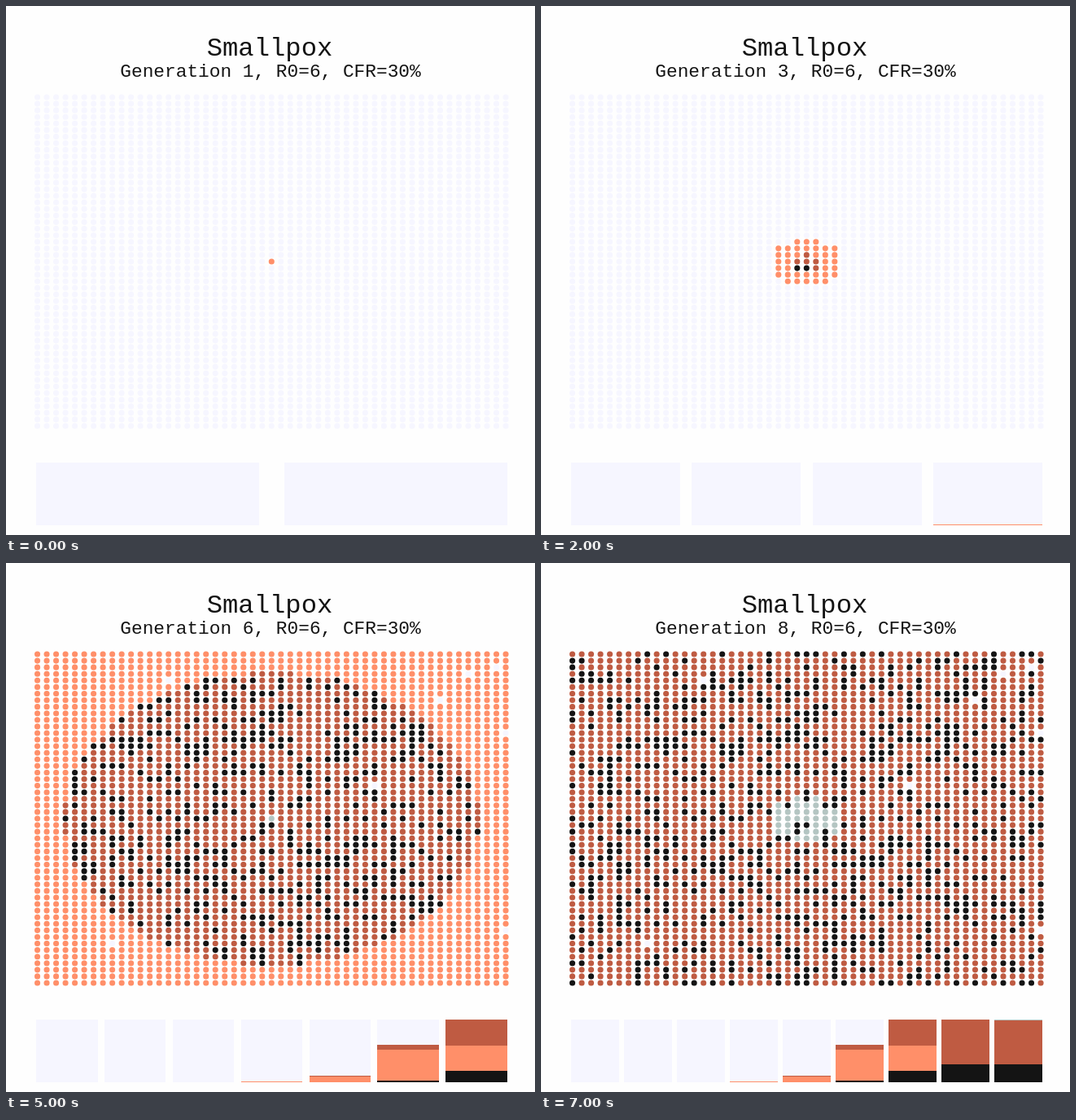
Animation of 650x650 px, one loop 8 s. Source, as an HTML page with a canvas:

```html
<!DOCTYPE html>
<html lang="en">
<head>
<meta charset="utf-8">
<title>Smallpox</title>
<style>
  html, body { margin: 0; width: 100%; height: 100%; overflow: hidden; background: #fefefe; }
  canvas, svg { position: absolute; left: 0; top: 0; display: block; }
  text { font-family: "Liberation Mono", "DejaVu Sans Mono", monospace; fill: #141414; text-anchor: middle; }
</style>
</head>
<body>
<canvas width="650" height="650"></canvas>
<svg width="650" height="650">
  <text x="324" y="61" font-size="32.2">Smallpox</text>
  <text id="info" x="325" y="87" font-size="22.8"></text>
</svg>
<script>
const SIZE = 51, MID = 25, R0 = 6, DEATH_RATE = 0.285, LAST = 8, STEP = 1000;
const COLOR = { well: '#f6f6ff', ill: '#ff8f69', immune: '#bf5b42', dead: '#141414', waned: '#b4c5c2' };
const ctx = document.querySelector('canvas').getContext('2d');
const info = document.getElementById('info');

// Cells that are never infected: column, row
const SPARED = new Set(['36,20', '14,4', '8,44', '43,7', '46,3', '49,2', '50,12', '50,42']);

function random(seed) {
  return () => {
    seed = seed + 0x6D2B79F5 | 0;
    let v = Math.imul(seed ^ seed >>> 15, 1 | seed);
    v = v + Math.imul(v ^ v >>> 7, 61 | v) ^ v;
    return ((v ^ v >>> 14) >>> 0) / 4294967296;
  };
}

function makeCells() {
  const cells = [], rnd = random(11);
  for (let row = 0; row < SIZE; row++)
    for (let col = 0; col < SIZE; col++)
      cells.push({ row, col, dist: (row - MID) ** 2 + (col - MID) ** 2 });
  // The infection spreads outwards, lower rows first among equals
  cells.sort((a, b) => a.dist - b.dist || b.row - a.row);
  let gen = 1, batch = 1, end = 1;
  cells.forEach((c, i) => {
    if (i === end) { gen++; batch *= R0; end += batch; }
    c.caught = SPARED.has(c.col + ',' + c.row) ? Infinity : gen;
    // The first few cases are too few for chance
    c.dies = gen < 3 ? i % 4 === 1 : rnd() < DEATH_RATE;
  });
  return cells;
}

function state(c, gen) {
  if (gen < c.caught) return 'well';
  if (gen === c.caught) return 'ill';
  if (c.dies) return 'dead';
  return gen >= c.caught + 5 ? 'waned' : 'immune';
}

const cells = makeCells();
const tallies = Array.from({ length: LAST + 1 }, (_, gen) => {
  const tally = { well: 0, ill: 0, immune: 0, dead: 0, waned: 0 };
  cells.forEach(c => tally[state(c, gen)]++);
  return tally;
});

function drawDots(gen) {
  for (const c of cells) {
    ctx.fillStyle = COLOR[state(c, gen)];
    ctx.beginPath();
    ctx.arc(38.55 + c.col * 11.51, 112 + c.row * 8.08, 3.55, 0, 7);
    ctx.fill();
  }
}

function drawPanel(x, width, tally) {
  const top = 561, height = 77;
  const left = Math.round(x - 0.15), right = Math.round(x + width);
  const bar = (color, from, to) => {
    ctx.fillStyle = color;
    ctx.fillRect(left, from, right - left, to - from);
  };
  bar(COLOR.well, top, top + height);
  let sum = 0;
  const edge = () => Math.round(top + height * (1 - sum / cells.length));
  for (const key of ['dead', 'ill', 'immune', 'waned']) {
    const bottom = edge();
    sum += tally[key];
    bar(COLOR[key], edge(), bottom);
  }
}

function draw(gen) {
  ctx.fillStyle = '#fefefe';
  ctx.fillRect(0, 0, 650, 650);
  drawDots(gen);
  const pitch = 579 / (gen + 0.9);
  for (let i = 0; i <= gen; i++) drawPanel(37 + i * pitch, pitch * 0.9, tallies[i]);
  info.textContent = `Generation ${gen}, R0=6, CFR=30%`;
}

let shown = 0;
const start = performance.now();
function tick(now) {
  const gen = Math.floor(Math.max(0, now - start) / STEP) % LAST + 1;
  if (gen !== shown) draw(shown = gen);
  requestAnimationFrame(tick);
}
tick(start);
</script>
</body>
</html>
```
